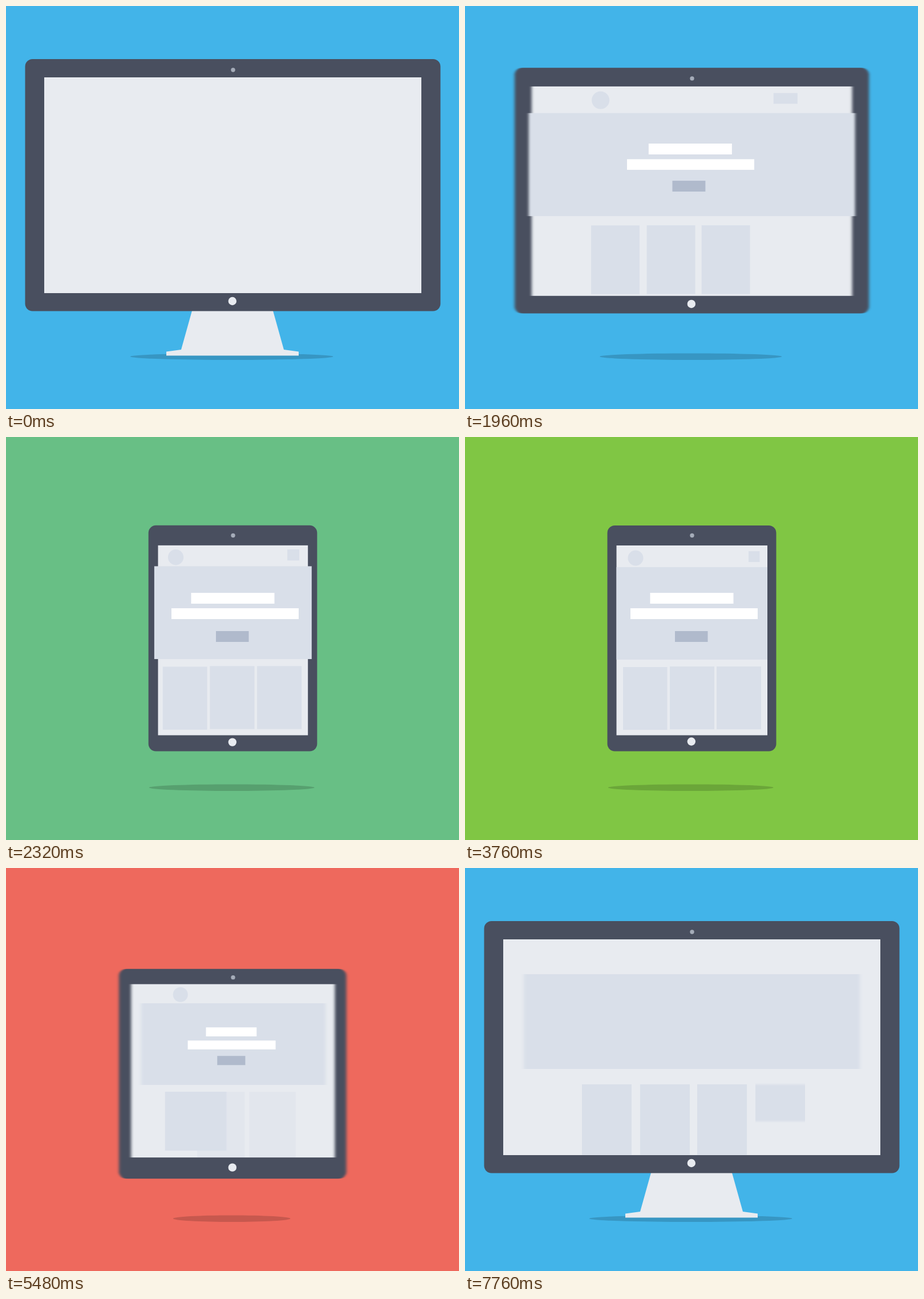
An HTML page without scripts that plays this animation: 794 px wide and 706 px high, repeating every 8660 ms.

```html
<!DOCTYPE html>
<html lang="en">
<head>
<meta charset="utf-8">
<title>Responsive devices</title>
<style>
html, body { margin: 0; width: 100%; height: 100%; overflow: hidden; }
body { background: #42b4e9; animation: sky 8.66s linear infinite; }
svg { display: block; width: 100%; height: 100%; }

rect, circle, ellipse, polygon, .ray { animation: 8.66s ease-in-out infinite both; }
.dark { fill: #494f5f; }
.light { fill: #e8ebf0; }
.block { fill: #d9dfe9; }
.white { fill: #fff; }
.pop { transform-box: fill-box; transform-origin: center; }
#stand { transform-origin: 397px 534px; animation-name: stand; }
#shadow { fill: #000; opacity: .165; animation-name: shadow; }
#frame { animation-name: frame, smear; animation-timing-function: ease-in-out, step-end; }
#screen { animation-name: screen, smear; animation-timing-function: ease-in-out, step-end; }
#camera { fill: #a5acb9; animation-name: camera; }
#home { animation-name: home; }
#hero { animation-name: hero, heroSmear; animation-timing-function: ease-in-out, step-end; }
#logo { animation-name: logo, pop; }
#nav1, #nav2 { animation-name: links, pop; }
#nav3 { animation-name: menu, pop; }
#line1 { animation-name: line1, pop; }
#line2 { animation-name: line2, pop; }
#button { fill: #b0bacc; animation-name: button, pop; }
#nav1, #line1 { animation-delay: 0s, .05s; }
#nav2, #line2 { animation-delay: 0s, .1s; }
#nav3 { animation-delay: 0s, .15s; }
#button { animation-delay: 0s, .2s; }
#card1 { animation-name: card1; }
#card2 { animation-name: card2; }
#card3 { animation-name: card3; }
#card4 { animation-name: card4, cardSmear; animation-timing-function: ease-in-out, step-end; }
.ray { fill: none; stroke: #d5edf9; stroke-width: 1.6; animation-name: ray; animation-timing-function: ease-out; }

@keyframes sky {
  0%, 25.4% { background: #42b4e9; }
  27.71%, 48.96% { background: #80c644; }
  51.27%, 66.97% { background: #ee695d; }
  69.28%, 100% { background: #42b4e9; }
}
@keyframes stand {
  0%, 18.4% { transform: none; }
  21.71%, 65.59% { transform: scaleY(0); }
  68.36%, 100% { transform: none; }
}
@keyframes shadow {
  0%, 19.5% { rx: 178px; }
  25.4%, 43.42% { rx: 145px; }
  48%, 61.89% { rx: 85px; }
  66.51%, 100% { rx: 178px; }
}
@keyframes frame {
  0%, 21.2% { x: 33.5px; y: 93px; width: 728px; height: 441.5px; }
  25.4% { x: 250px; y: 154.5px; width: 295px; height: 396px; }
  27.71%, 43.42% { x: 249.5px; y: 155px; width: 296px; height: 395.5px; }
  47.58%, 61.43% { x: 312px; y: 235px; width: 170px; height: 316px; }
  65.59%, 100% { x: 33.5px; y: 93px; width: 728px; height: 441.5px; }
}
@keyframes screen {
  0%, 21.2% { x: 67px; y: 125px; width: 661px; height: 378px; }
  25.4% { x: 268.5px; y: 189.5px; width: 259px; height: 333px; }
  27.71%, 43.42% { x: 265.5px; y: 190px; width: 264.5px; height: 332.5px; }
  47.58%, 61.43% { x: 325px; y: 258px; width: 146px; height: 252px; }
  65.59%, 100% { x: 67px; y: 125px; width: 661px; height: 378px; }
}
@keyframes camera {
  0%, 21.2% { cy: 112px; }
  25.4%, 43.42% { cy: 172.5px; }
  47.58%, 61.43% { cy: 247px; }
  65.59%, 100% { cy: 112px; }
}
@keyframes home {
  0%, 21.2% { cy: 517px; }
  25.4% { cy: 537px; }
  27.71%, 43.42% { cy: 533.5px; }
  47.58%, 61.43% { cy: 530px; }
  65.59%, 100% { cy: 517px; }
}
@keyframes hero {
  0%, 2.77% { x: 397.5px; y: 269px; width: 0px; height: 0px; }
  5.5%, 21.2% { x: 67px; y: 176px; width: 661px; height: 186px; }
  25.4% { x: 248px; y: 223px; width: 300px; height: 164px; }
  27.71%, 43.42% { x: 265.5px; y: 228px; width: 264.5px; height: 162px; }
  47.58%, 61.43% { x: 325px; y: 283px; width: 146px; height: 107px; }
  63.28% { x: 237px; y: 237px; width: 323px; height: 143px; }
  66%, 86.8% { x: 67px; y: 176px; width: 661px; height: 186px; }
  89.61%, 100% { x: 103px; y: 186px; width: 589px; height: 166px; }
}
@keyframes logo {
  0%, 21.2% { cx: 219px; cy: 151px; r: 16px; }
  25.4% { cx: 294.5px; cy: 208px; r: 14px; }
  27.71%, 43.42% { cx: 299px; cy: 212px; r: 13.5px; }
  47.58%, 61.43% { cx: 366px; cy: 271px; r: 11px; }
  65.59%, 100% { cx: 219px; cy: 151px; r: 16px; }
}
@keyframes links {
  0%, 18.48% { opacity: 1; }
  21.2%, 65.59% { opacity: 0; }
  68.36%, 100% { opacity: 1; }
}
@keyframes menu {
  0%, 21.2% { x: 559px; y: 140px; width: 48px; height: 18.5px; }
  25.4% { x: 485px; y: 190.5px; width: 24px; height: 20px; }
  27.71%, 43.42% { x: 497px; y: 200px; width: 19.5px; height: 19px; }
  47.58%, 61.43% { x: 443px; y: 263px; width: 15px; height: 15px; opacity: 1; }
  62.4% { opacity: 0; }
  65.59% { x: 559px; y: 140px; width: 48px; height: 18.5px; opacity: 0; }
  68.36%, 100% { x: 559px; y: 140px; width: 48px; height: 18.5px; opacity: 1; }
}
@keyframes line1 {
  0%, 21.2% { x: 321px; y: 230.5px; width: 146px; height: 19px; }
  25.4%, 43.42% { x: 324.5px; y: 273px; width: 146px; height: 19px; }
  47.58%, 61.43% { x: 371px; y: 313px; width: 49px; height: 13.5px; }
  65.59%, 100% { x: 321px; y: 230.5px; width: 146px; height: 19px; }
}
@keyframes line2 {
  0%, 21.2% { x: 282px; y: 258px; width: 223px; height: 18.5px; }
  25.4%, 43.42% { x: 290px; y: 300px; width: 223px; height: 19px; }
  47.58%, 61.43% { x: 344px; y: 333px; width: 106px; height: 13.5px; }
  65.59%, 100% { x: 282px; y: 258px; width: 223px; height: 18.5px; }
}
@keyframes button {
  0%, 21.2% { x: 362px; y: 295px; width: 58px; height: 19px; }
  25.4%, 43.42% { x: 368px; y: 340px; width: 57.5px; height: 19px; }
  47.58%, 61.43% { x: 376px; y: 353px; width: 43px; height: 14px; }
  65.59%, 100% { x: 362px; y: 295px; width: 58px; height: 19px; }
}
@keyframes card1 {
  0%, 6% { x: 205px; y: 379px; width: 87px; height: 0px; }
  8%, 21.2% { x: 205px; y: 379px; width: 87px; height: 123.5px; }
  25.4% { x: 270px; y: 401px; width: 78.5px; height: 111px; }
  27.71%, 43.42% { x: 277px; y: 403px; width: 77.5px; height: 110px; }
  47.58%, 61.43% { x: 330px; y: 401px; width: 122px; height: 89px; }
  65.59%, 100% { x: 205px; y: 379px; width: 87px; height: 123.5px; }
}
@keyframes card2 {
  0%, 6.7% { x: 307px; y: 379px; width: 87px; height: 0px; }
  8.7%, 21.2% { x: 307px; y: 379px; width: 87px; height: 123.5px; }
  25.4% { x: 354px; y: 400px; width: 78.5px; height: 111px; }
  27.71%, 43.42% { x: 359px; y: 402px; width: 78px; height: 110px; opacity: 1; }
  45.3% { opacity: 0; }
  47.58%, 61.43% { x: 355px; y: 401px; width: 80px; height: 109px; opacity: 0; }
  65.59%, 100% { x: 307px; y: 379px; width: 87px; height: 123.5px; opacity: 1; }
}
@keyframes card3 {
  0%, 7.4% { x: 407px; y: 379px; width: 87px; height: 0px; }
  9.4%, 21.2% { x: 407px; y: 379px; width: 87px; height: 123.5px; }
  25.4% { x: 438px; y: 400px; width: 78.5px; height: 111px; }
  27.71%, 43.42% { x: 441px; y: 402px; width: 78px; height: 110px; opacity: 1; }
  45.3% { opacity: 0; }
  47.58%, 61.43% { x: 440px; y: 401px; width: 77px; height: 109px; opacity: 0; }
  65.59%, 100% { x: 407px; y: 379px; width: 87px; height: 123.5px; opacity: 1; }
}
@keyframes card4 {
  0%, 8.1% { height: 0px; }
  10.16%, 18.48% { height: 123.5px; }
  21.2%, 65.59% { height: 0px; }
  68.36%, 86.8% { height: 123.5px; }
  89.61%, 100% { height: 65px; }
}
@keyframes pop {
  0%, 4.2% { transform: scale(0); }
  6.5%, 84.99% { transform: none; }
  87%, 100% { transform: scale(0); }
}
@keyframes ray {
  0%, 21.2% { opacity: 0; transform: translateY(-15px) scaleY(3); }
  21.3% { opacity: 1; transform: translateY(-15px) scaleY(3); }
  25.4% { opacity: .75; transform: translateY(-92px); }
  26.3%, 100% { opacity: 0; transform: translateY(-94px); }
}
@keyframes smear {
  0%, 26.8%, 47.2%, 65.2%, 100% { filter: none; }
  21.9%, 44%, 62% { filter: url(#wide); }
}
@keyframes heroSmear {
  0%, 26.8%, 47.2%, 65.2% { filter: none; }
  21.9%, 44%, 62%, 87.3%, 100% { filter: url(#wide); }
}
@keyframes cardSmear {
  0% { filter: none; }
  87.3%, 100% { filter: url(#tall); }
}
</style>
</head>
<body>
<svg viewBox="0 0 794 706">
  <defs>
    <filter id="wide" color-interpolation-filters="sRGB"><feGaussianBlur stdDeviation="2.4 .5"/></filter>
    <filter id="tall" color-interpolation-filters="sRGB"><feGaussianBlur stdDeviation="0.1 1.5"/></filter>
    <g id="burst">
      <g><path class="ray" d="M0-3.5v7"/></g>
      <g transform="rotate(72)"><path class="ray" d="M0-3.5v7"/></g>
      <g transform="rotate(144)"><path class="ray" d="M0-3.5v7"/></g>
      <g transform="rotate(216)"><path class="ray" d="M0-3.5v7"/></g>
      <g transform="rotate(288)"><path class="ray" d="M0-3.5v7"/></g>
    </g>
  </defs>

  <ellipse id="shadow" cx="395.7" cy="614.2" rx="178" ry="5.8"/>
  <polygon id="stand" class="light" points="326,534 468,534 487,602 513,605.5 513,612.5 281,612.5 281,605.5 307,602"/>
  <rect id="frame" class="dark" rx="13"/>
  <rect id="screen" class="light"/>
  <circle id="camera" cx="398" r="3.7"/>
  <circle id="home" class="light" cx="396.8" r="7.2"/>

  <use href="#burst" x="555" y="166"/>
  <use href="#burst" x="185.500" y="555"/>

  <rect id="hero" class="block"/>
  <circle id="logo" class="block pop"/>
  <rect id="nav1" class="block pop" x="414" y="140" width="48.500" height="18.500"/>
  <rect id="nav2" class="block pop" x="473" y="140" width="76" height="18.500"/>
  <rect id="nav3" class="block pop"/>
  <rect id="line1" class="white pop"/>
  <rect id="line2" class="white pop"/>
  <rect id="button" class="pop"/>
  <rect id="card4" class="block" x="509" y="379" width="87" height="123.500"/>
  <rect id="card3" class="block"/>
  <rect id="card2" class="block"/>
  <rect id="card1" class="block"/>
</svg>
</body>
</html>
```
